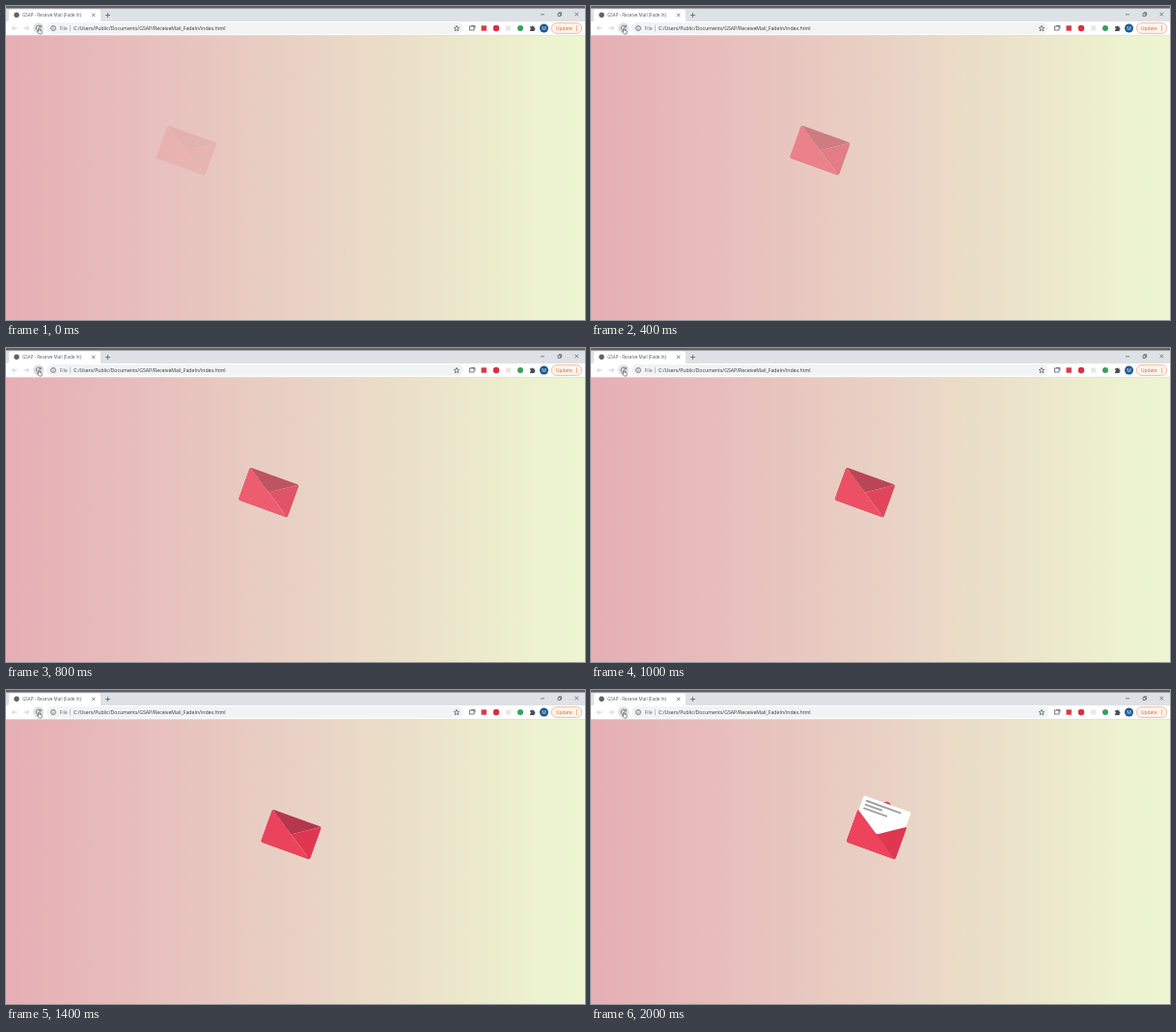
These frames come from a looping animation (600 px wide and 325 px high, 2.5 s). An HTML page:

```html
<!DOCTYPE html>
<html lang="en">
<head>
<meta charset="utf-8">
<title>Receive Mail</title>
<style>
  html, body { margin: 0; width: 100%; height: 100%; overflow: hidden; }
  svg { display: block; width: 600px; height: 325px; }
  text { font-family: "Open Sans", "Noto Sans", sans-serif; }
  .line { fill: none; stroke: #5f6368; stroke-width: .8; }
  .pale { stroke: #bfc2c6; }
</style>
</head>
<body>
<svg viewBox="0 0 600 325">
  <defs>
    <linearGradient id="sky">
      <stop stop-color="#e6aeb5"/>
      <stop offset=".5" stop-color="#e9d1c4"/>
      <stop offset=".92" stop-color="#edf2cf"/>
      <stop offset="1" stop-color="#edf5d1"/>
    </linearGradient>
    <clipPath id="body"><rect width="54" height="36" rx="2.4"/></clipPath>
  </defs>
  <rect width="600" height="325" fill="url(#sky)"/>

  <!-- tab strip -->
  <rect width="600" height="17" fill="#dee1e6"/>
  <rect width="600" height="2.5" fill="#606064"/>
  <path d="M1 16.5q2 0 2-2V5.500q0-2 2-2H96q2 0 2 2v9q0 2 2 2z" fill="#fff"/>
  <circle cx="11" cy="9.300" r="2.700" fill="#5f6368"/>
  <text x="17" y="11" font-size="4.570" fill="#55585c">GSAP - Receive Mail (Fade In)</text>
  <path class="line" d="M89 7.700l3.200 3.200m0-3.200l-3.200 3.200M103 9.500h5m-2.500-2.500v5"/>
  <path class="line" stroke-width=".7" d="M554 8.800h4M572 7.700h2.600v2.800h-2.600zM573 7.500v-.8h2.600v2.800h-.8M589.500 6.700l3.600 3.600m0-3.600l-3.600 3.600"/>

  <!-- toolbar -->
  <rect y="16" width="600" height="14.300" fill="#fff"/>
  <rect y="29.900" width="600" height=".6" fill="#d5d5d5"/>
  <path class="line pale" d="M11.500 23h-5m2.200-2.200L6.500 23l2.200 2.200M18.500 23h5m-2.200-2.200l2.200 2.200-2.200 2.200"/>
  <circle cx="33.700" cy="22.800" r="5.600" fill="#dfe1e5"/>
  <path class="line" d="M35.800 21.200a2.600 2.600 0 1 0 .4 2.500M36.300 19.800v2h-2"/>
  <rect x="42" y="17" width="432" height="11.800" rx="5.900" fill="#f1f3f4"/>
  <circle class="line" cx="49" cy="23" r="2.500"/>
  <path class="line" d="M49 22.700v1.600m0-3v.6"/>
  <text x="55.500" y="24.900" font-size="5.180" fill="#6b6f74">File</text>
  <path d="M66.500 19.800v6.400" stroke="#a5a8ac" stroke-width=".6"/>
  <text x="70" y="24.900" font-size="5.180" fill="#303236">C:/Users/Public/Documents/GSAP/ReceiveMail_FadeIn/index.html</text>
  <path class="line" stroke-width=".7" d="M467 20.300l.8 1.900 2 .2-1.500 1.300.5 2-1.800-1.100-1.800 1.100.5-2-1.500-1.300 2-.2z"/>

  <!-- extensions -->
  <rect class="line" x="480.500" y="21" width="4.500" height="4"/>
  <path class="line" d="M482 20.500h4v3"/>
  <rect x="492.500" y="20.300" width="5.400" height="5.400" fill="#d63a48"/>
  <circle cx="508" cy="23" r="3.200" fill="#dc2f3d"/>
  <rect x="518" y="20.500" width="5" height="5" fill="#e6e7e9"/>
  <circle cx="533" cy="23" r="3" fill="#38a05a"/>
  <path d="M543 21.300h1.500a.9.900 0 1 1 1.800 0h1.300v1.500a.9.900 0 1 1 0 1.800v1.300h-4.600v-1.500a.9.900 0 0 0 0-1.800z" fill="#4a4d51"/>
  <circle cx="557.500" cy="23" r="4.500" fill="#1a5a92"/>
  <text x="557.500" y="24.800" font-size="5" fill="#fff" text-anchor="middle">M</text>
  <rect x="565.300" y="17.600" width="31.500" height="10.800" rx="5.400" fill="#fef3ec" stroke="#e9a87c" stroke-width=".7"/>
  <text x="570" y="24.900" font-size="4.900" fill="#d9641f">Update</text>
  <g fill="#d9641f"><circle cx="591.500" cy="21" r=".55"/><circle cx="591.500" cy="23" r=".55"/><circle cx="591.500" cy="25" r=".55"/></g>

  <!-- pointing hand -->
  <path d="M33.600 23.300q.7-.6 1.300 0v2l2 .5q.6.300.5 1.200l-.6 2h-2.400l-1.900-2.300q.2-.8 1.100-.2z" fill="#fff" stroke="#222" stroke-width=".5"/>

  <g id="mail">
    <rect width="54" height="36" rx="2.400" fill="#b5374b"/>
    <path id="back" d="M1 0H53L29 17Q27 18.600 25 17z" fill="#d8374f"/>
    <g id="letter">
      <rect x="1" width="52" height="33" rx="1.200" fill="#fff"/>
      <path d="M5 4.300H43.500M5 8.300H24M5 12.300H31" stroke="#a2a2a4" stroke-width="2"/>
    </g>
    <g clip-path="url(#body)">
      <path d="M54 0V36H54L27 18z" fill="#df3751"/>
      <path d="M0 0L27 18L54 36H0z" fill="#ed435c"/>
      <path id="front" d="M0 0H54L27 18z" fill="#b5374b"/>
    </g>
  </g>
</svg>
<script>
const [mail, back, letter, front] = ["mail", "back", "letter", "front"].map(id => document.getElementById(id));
const put = (el, transform) => el.setAttribute("transform", transform);

// Quadratic ease-out from 0 to 1
const ease = (t, start, length) => {
  const left = 1 - Math.min(1, Math.max(0, (t - start) / length));
  return 1 - left * left;
};

function draw(now) {
  // Ten poses a second, with a rest on the last one
  const t = Math.min(2, Math.floor(now % 2500 / 100) / 10);

  const slide = ease(t, 0, 1.5);
  put(mail, `translate(${276.6 - 109 * (1 - slide)} 123.4) rotate(19.8)`);
  mail.setAttribute("opacity", 0.12 + 0.88 * slide);

  const fold = Math.cos(Math.PI * ease(t, 1.5, 0.5));
  const closed = fold > 0;
  put(front, `scale(1 ${fold})`);
  put(back, `scale(1 ${fold})`);
  front.style.display = closed ? "" : "none";
  back.style.display = closed ? "none" : "";

  put(letter, `translate(0 ${0.5 - 25 * ease(t, 1.8, 0.5)})`);
  requestAnimationFrame(draw);
}
draw(0);
</script>
</body>
</html>
```
